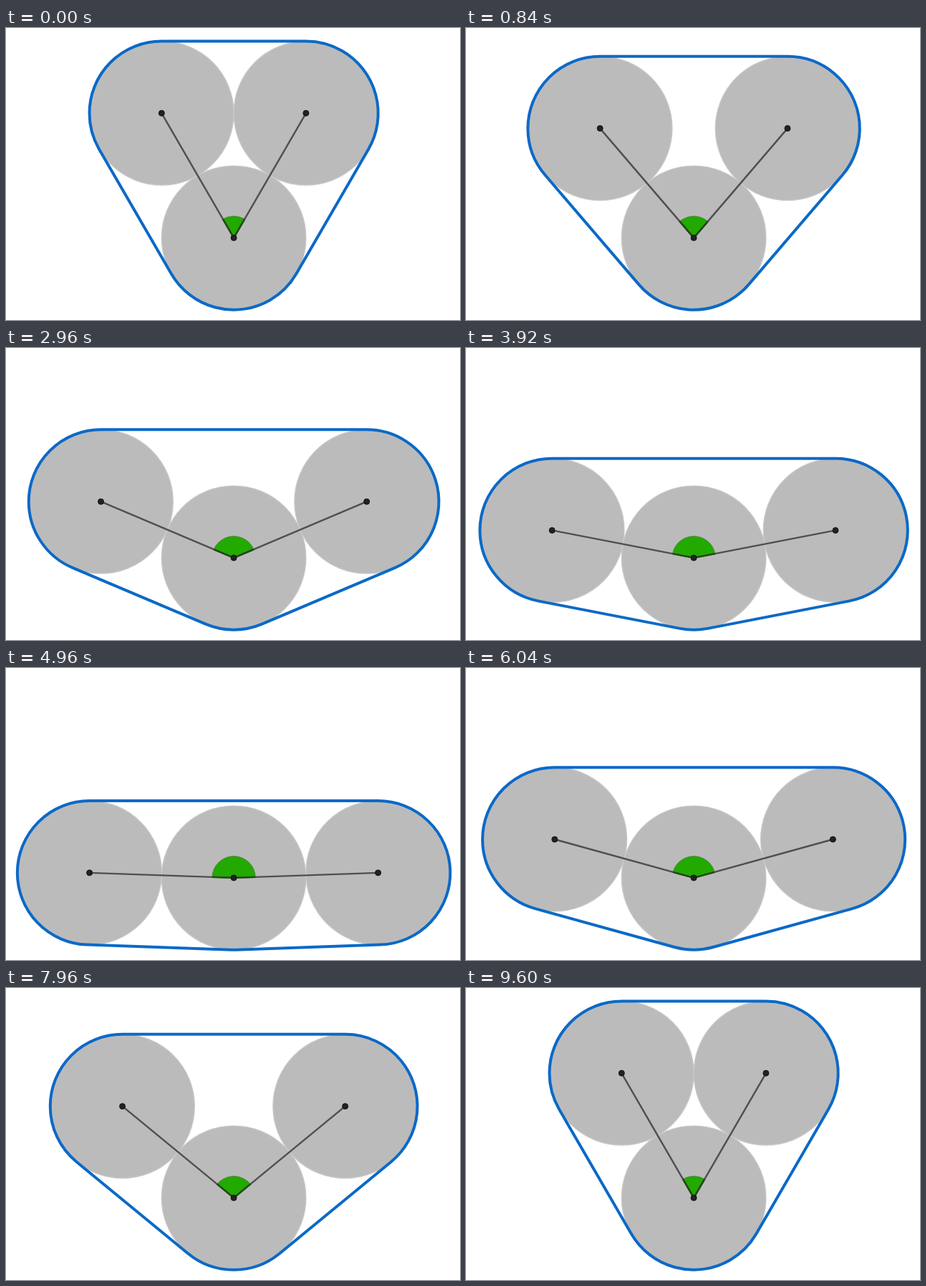
Write an HTML page with a canvas that moves like this. It is 634 px wide and 409 px high and loops after 9640 ms.

```html
<!DOCTYPE html>
<html lang="en">
<head>
<meta charset="utf-8">
<title>Belt around three circles</title>
<style>
  html, body { margin: 0; width: 100%; height: 100%; overflow: hidden; background: #fff; }
  canvas { display: block; }
</style>
</head>
<body>
<canvas id="stage" width="634" height="409"></canvas>
<script>
const ctx = document.getElementById('stage').getContext('2d');
const R = 100.8;
const SECTOR_R = 30.3;
const pivot = { x: 318.1, y: 293.9 };
const STEP = 40, STEPS = 241, HALF = 120;

function stroke(color, width) {
  ctx.strokeStyle = color;
  ctx.lineWidth = width;
  ctx.stroke();
}

function disc({ x, y }, r, fill, edge, width) {
  ctx.beginPath();
  ctx.arc(x, y, r, 0, Math.PI * 2);
  ctx.fillStyle = fill;
  ctx.fill();
  stroke(edge, width);
}

// Point at a distance from the pivot, tilted from vertical.
function polar(tilt, distance) {
  return {
    x: pivot.x + Math.sin(tilt) * distance,
    y: pivot.y - Math.cos(tilt) * distance
  };
}

function vee(from, to, color, width) {
  ctx.beginPath();
  ctx.moveTo(from.x, from.y);
  ctx.lineTo(pivot.x, pivot.y);
  ctx.lineTo(to.x, to.y);
  stroke(color, width);
}

function sector(tilt) {
  const start = -Math.PI / 2 - tilt, end = -Math.PI / 2 + tilt;
  ctx.beginPath();
  ctx.moveTo(pivot.x, pivot.y);
  ctx.arc(pivot.x, pivot.y, SECTOR_R, start, end);
  ctx.closePath();
  ctx.fillStyle = '#22aa00';
  ctx.fill();
  ctx.beginPath();
  ctx.arc(pivot.x, pivot.y, SECTOR_R, start, end);
  stroke('rgba(70,110,60,0.6)', 1);
}

function belt(left, right, tilt) {
  const top = -Math.PI / 2;
  ctx.beginPath();
  ctx.arc(left.x, left.y, R, top, Math.PI - tilt, true);
  ctx.arc(pivot.x, pivot.y, R, Math.max(tilt, Math.PI - tilt), tilt, true);
  ctx.arc(right.x, right.y, R, tilt, top, true);
  ctx.closePath();
  stroke('#0b69c7', 4);
}

function draw(time) {
  const step = Math.floor(time / STEP + 0.001) % STEPS;
  const degrees = 30 + 0.5 * (HALF - Math.abs(HALF - step));
  const tilt = degrees * Math.PI / 180;
  const left = polar(-tilt, 2 * R), right = polar(tilt, 2 * R);
  const centers = [left, right, pivot];

  ctx.fillStyle = '#fff';
  ctx.fillRect(0, 0, 634, 409);
  ctx.lineJoin = 'round';
  centers.forEach(c => disc(c, R, '#bbbbbb', '#c8c8c8', 1.3));
  sector(tilt);
  vee(left, right, '#4f4f4f', 2.4);
  vee(polar(-tilt, SECTOR_R), polar(tilt, SECTOR_R), '#1e4a12', 2.4);
  belt(left, right, tilt);
  centers.forEach(c => disc(c, 4, '#222', '#111', 1));
}

function tick() {
  draw(performance.now());
  requestAnimationFrame(tick);
}
tick();
</script>
</body>
</html>
```
